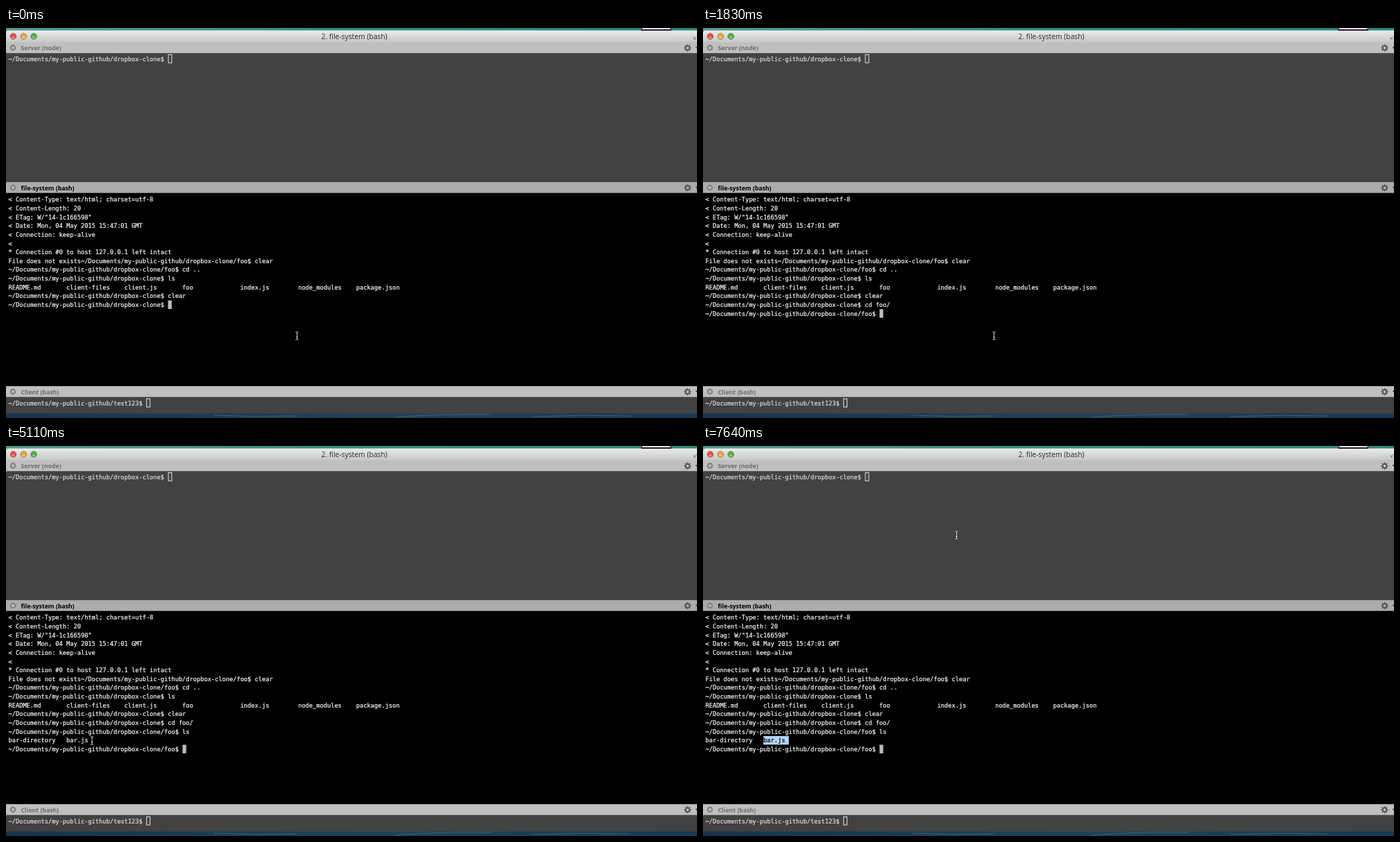
Write an HTML page that moves like this. It is 996 by 562 pixels and loops after 8000 ms.

```html
<!DOCTYPE html>
<html lang="en">
<head>
<meta charset="utf-8">
<title>Terminal</title>
<style>
  html, body { margin: 0; width: 100%; height: 100%; overflow: hidden; background: #424242; }
  svg { display: block; width: 996px; height: 562px; }
  text { white-space: pre; }
  .mono { font: 8.68px "DejaVu Sans Mono", monospace; stroke-width: .22px; }
  .head { font: bold 8.75px "Open Sans", "Noto Sans", sans-serif; }
  .title { font: 10.3px "Open Sans", "Noto Sans", sans-serif; }
</style>
</head>
<body>
<svg id="stage" viewBox="0 0 996 562" xmlns="http://www.w3.org/2000/svg">
  <defs>
    <linearGradient id="sky"><stop offset="0" stop-color="#4c9a8c"/><stop offset=".5" stop-color="#2f9180"/><stop offset="1" stop-color="#2a8a76"/></linearGradient>
    <linearGradient id="sea"><stop offset="0" stop-color="#17344f"/><stop offset=".55" stop-color="#1d4359"/><stop offset="1" stop-color="#163a55"/></linearGradient>
    <linearGradient id="bar" x2="0" y2="1"><stop offset="0" stop-color="#ebebeb"/><stop offset="1" stop-color="#c6c6c6"/></linearGradient>
  </defs>
  <rect width="996" height="5" fill="url(#sky)"/>
  <rect y="555" width="996" height="7" fill="url(#sea)"/>
  <path d="M560 561Q620 556 700 557M300 558Q360 561 420 559M760 560Q830 557 900 559" stroke="#7f9dac" stroke-opacity=".35" fill="none"/>
  <path d="M0 21V7Q0 3.5 4 3.5H996V21Z" fill="url(#bar)"/>
  <path d="M915.5 0H959V4H915.5Z" fill="#35243a"/>
  <path d="M917 0H957.5V1.8H917Z" fill="#f2f2f2"/>
  <path d="M996 11.5L992 15.5M991.5 13V16H994.5" stroke="#777" fill="none"/>
  <text class="title" x="454.5" y="15.8" fill="#2a2a2a">2. file-system (bash)</text>
</svg>
<script>
const LOOP = 8000, LEFT = 3.5, CHAR = 5.226, ROW = 12.66, TOP = 240.4;
const REPO = "~/Documents/my-public-github/dropbox-clone";
const HOME = REPO + "$ ", FOO = REPO + "/foo$ ";
const stage = document.getElementById("stage");

function add(tag, attrs, parent = stage) {
  const el = document.createElementNS("http://www.w3.org/2000/svg", tag);
  for (const k in attrs) el.setAttribute(k, attrs[k]);
  return parent.appendChild(el);
}
function label(cls, x, y, fill, str) {
  const el = add("text", { class: cls, x, y, fill });
  if (cls === "mono") el.setAttribute("stroke", fill);
  el.textContent = str;
  return el;
}
const colX = col => LEFT + col * CHAR;
const rowY = row => TOP + row * ROW;

// mid is the line through the middle of the label
function header(mid, name, active) {
  add("rect", { y: mid - 7.9, width: 996, height: 15.6, fill: active ? "#acacac" : "#bfbfbf" });
  add("circle", { cx: 10, cy: mid, r: 4.4, fill: "#858585" });
  add("path", { d: `M8.3 ${mid - 1.7}l3.4 3.4m0 -3.4l-3.4 3.4`, stroke: "#d4d4d4", "stroke-width": 1.1 });
  label("head", 21.5, mid + 3.5, active ? "#000" : "#6c6c6c", name);
  const gear = add("g", { transform: `translate(982.5 ${mid + .2})`, stroke: "#4c4c4c", fill: "none" });
  for (let i = 0; i < 8; i++)
    add("path", { d: "M0 -3V-5.2", "stroke-width": 1.5, transform: `rotate(${i * 45})` }, gear);
  add("circle", { r: 2.8, "stroke-width": 1.5 }, gear);
  add("path", { d: `M993.5 ${mid - 1.2}h5l-2.5 3z`, fill: "#333" });
}

// top is the upper edge of the prompt row
function idlePane(y, h, top, prompt) {
  add("rect", { y, width: 996, height: h, fill: "#424242" });
  label("mono", LEFT, top + 9.8, "#dadada", prompt);
  add("rect", { x: colX(prompt.length) + .6, y: top + .5, width: 4.9, height: 11.8, fill: "none", stroke: "#e6e6e6" });
}

["#ee5048", "#f0ac35", "#4fb445"].forEach((fill, i) => {
  add("circle", { cx: 10.5 + i * 14.8, cy: 12, r: 4.3, fill, stroke: "#00000070", "stroke-width": .8 });
  add("ellipse", { cx: 10.5 + i * 14.8, cy: 14, rx: 2.6, ry: 1.6, fill: "#fff", "fill-opacity": .3 });
});

idlePane(21, 202, 37.9, HOME);
header(28.5, "Server (node)", false);
add("rect", { y: 235, width: 996, height: 283, fill: "#000" });
header(230, "file-system (bash)", true);
idlePane(530, 25.5, 533.8, "~/Documents/my-public-github/test123$ ");
header(524, "Client (bash)", false);

const files = ["README.md", "client-files", "client.js", "foo", "index.js", "node_modules", "package.json"];
const log = [
  "< Content-Type: text/html; charset=utf-8",
  "< Content-Length: 20",
  '< ETag: W/"14-1c166598"',
  "< Date: Mon, 04 May 2015 15:47:01 GMT",
  "< Connection: keep-alive",
  "<",
  "* Connection #0 to host 127.0.0.1 left intact",
  "File does not exists" + FOO + "clear",
  FOO + "cd ..",
  HOME + "ls",
  files.map(f => f.padEnd(16)).join("").trimEnd(),
  HOME + "clear"
];
const line = (row, str) => label("mono", LEFT, rowY(row) + 9.8, "#fafafa", str);
log.forEach((str, i) => line(i, str));

const caret = add("rect", { width: 5.3, height: 12.4, fill: "#bdbdbd" });
const live = [12, 13, 14, 15].map(row => line(row, ""));
const mark = add("rect", { y: rowY(14) + .3, height: 12.4, fill: "#b5d5ff" });
const picked = label("mono", 0, rowY(14) + 9.8, "#000", "");
const beam = add("g", { fill: "none" });
const shape = "M-2.1 -5.8Q-.3 -5.8 0 -4.6Q.3 -5.8 2.1 -5.8M0 -4.6V4.6M-2.1 5.8Q-.3 5.8 0 4.6Q.3 5.8 2.1 5.8M-1.2 2H1.2";
add("path", { d: shape, stroke: "#000", "stroke-opacity": .4, "stroke-width": 1.8 }, beam);
add("path", { d: shape, stroke: "#f0f0f0", "stroke-width": .9 }, beam);

// time, lines below the log
const done = HOME + "cd foo/";
const typing = [
  [0, [HOME]],
  [750, [HOME + "c"]],
  [900, [HOME + "cd"]],
  [1050, [HOME + "cd "]],
  [1230, [HOME + "cd fo"]],
  [1380, [HOME + "cd foo"]],
  [1530, [done]],
  [1830, [done, FOO]],
  [2130, [done, FOO + "l"]],
  [2280, [done, FOO + "ls"]],
  [2430, [done, FOO + "ls", "bar-directory   bar.js", FOO]]
];
// time, pointer x, pointer y
const moves = [
  [0, 419.5, 443.5],
  [4230, 402, 437], [4380, 345, 420], [4530, 270, 404], [4680, 200, 398.5],
  [4820, 152, 405], [4960, 131, 417], [5110, 124, 424.5], [5260, 122, 424.5],
  [5410, 102, 424.5], [5550, 84.5, 424.5],
  [6150, 175, 450], [6300, 262, 483.5], [6450, 315.5, 469.5], [6600, 349, 390],
  [6750, 340, 277.5], [6900, 300, 375], [7040, 278, 437.5],
  [7490, 325, 270], [7640, 365.5, 128.5]
];
// time, first selected column
const picks = [[0, 23], [5410, 19], [5550, 16]];

const stepAt = (steps, t) => steps.findLast(s => s[0] <= t);

function draw(t) {
  const lines = stepAt(typing, t)[1];
  live.forEach((el, i) => { el.textContent = lines[i] || ""; });
  const last = lines.length - 1;
  caret.setAttribute("x", colX(lines[last].length) + .1);
  caret.setAttribute("y", rowY(12 + last) + .2);

  const col = stepAt(picks, t)[1];
  mark.setAttribute("x", colX(col));
  mark.setAttribute("width", (23 - col) * CHAR);
  picked.setAttribute("x", colX(col));
  picked.textContent = "bar.js ".slice(col - 16);

  const [, x, y] = stepAt(moves, t);
  beam.setAttribute("transform", `translate(${x} ${y})`);
}

const start = performance.now();
function tick() {
  draw((performance.now() - start) % LOOP);
  requestAnimationFrame(tick);
}
tick();
</script>
</body>
</html>
```
